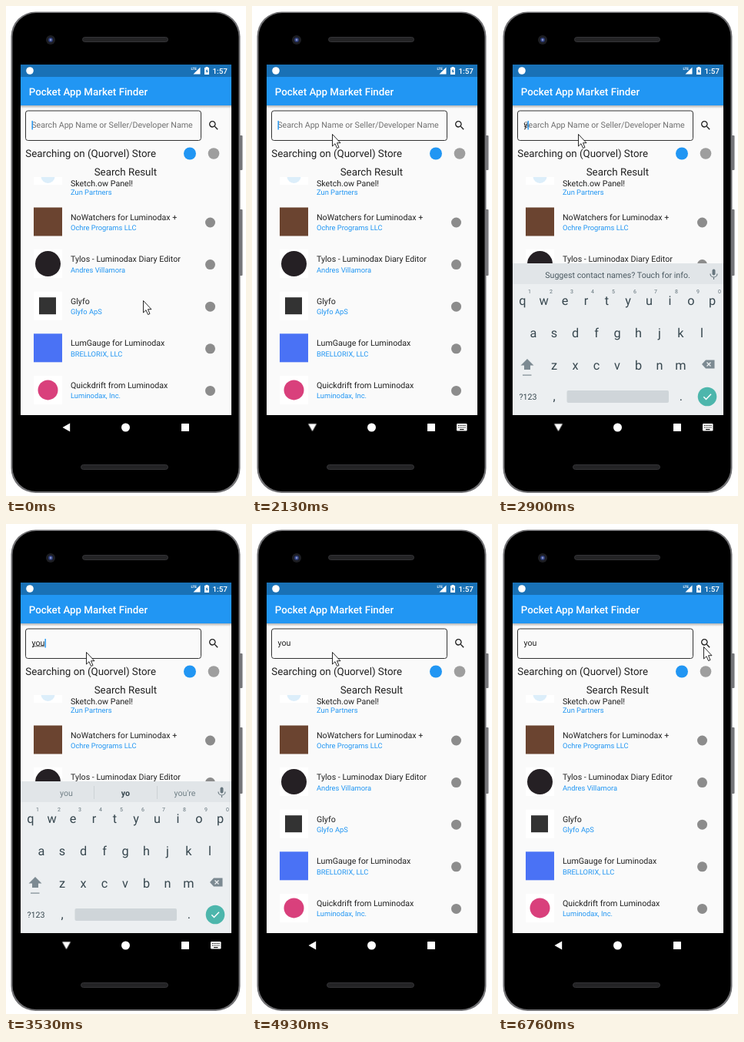
Animation of 312x636 px, one loop 8 s. Source, as an HTML page:

```html
<!DOCTYPE html>
<html lang="en">
<head>
<meta charset="utf-8">
<title>App search on a phone</title>
<style>
  html, body { margin: 0; width: 100%; height: 100%; overflow: hidden; background: #fff; }
  svg { display: block; font-family: Roboto, "Open Sans", sans-serif; text-rendering: geometricPrecision; }
  .h { font-size: 13.33px; fill: #212121; }
  .t { font-size: 10.67px; fill: #212121; }
  .s { font-size: 9.33px; fill: #2196f3; }
  .keys { font-size: 16.3px; fill: #37474f; text-anchor: middle; }
  .nums { font-size: 7px; fill: #607078; text-anchor: middle; }
  .strip { font-size: 10.67px; fill: #718087; text-anchor: middle; }
  .strip .mid { fill: #37474f; font-weight: 700; }

  .anim { animation: 8s linear infinite; }
  .hard { animation-timing-function: step-end; }

  #pointer { animation-name: pointer; }
  @keyframes pointer {
    0%, .4% { transform: translate(178px, 382px); animation-timing-function: ease-in-out; }
    6.625%, 10% { transform: translate(137px, 209px); }
    10.375% { transform: translate(133px, 204px); animation-timing-function: ease-out; }
    16.25%, 63.8% { transform: translate(104px, 166px); animation-timing-function: ease-in-out; }
    70% { transform: translate(257px, 160px); animation-timing-function: ease-out; }
    71.625%, 100% { transform: translate(267px, 159px); }
  }

  #caret { animation-name: caret; }
  @keyframes caret {
    0%, 12.5%, 25.375% { opacity: 1; transform: none; }
    6.625%, 18.25%, 32.5% { opacity: 0; transform: none; }
    36.25% { opacity: 1; transform: translateX(5px); }
    40% { opacity: 1; transform: translateX(11px); }
    44.125%, 56.25% { opacity: 1; transform: translateX(17px); }
    51.25%, 58.25%, 100% { opacity: 0; transform: translateX(17px); }
  }

  #hint { animation-name: hint; }
  @keyframes hint { 0% { opacity: 1; } 37.5%, 100% { opacity: 0; } }
  #typed1 { animation-name: typed1; }
  @keyframes typed1 { 0%, 40%, 100% { opacity: 0; } 36.25% { opacity: 1; } }
  #typed2 { animation-name: typed2; }
  @keyframes typed2 { 0%, 44.125%, 100% { opacity: 0; } 40% { opacity: 1; } }
  #typed3 { animation-name: typed3; }
  @keyframes typed3 { 0% { opacity: 0; } 44.125%, 100% { opacity: 1; } }
  #underline { animation-name: underline; }
  @keyframes underline { 0%, 46.25%, 100% { opacity: 0; } 44.125% { opacity: 1; } }

  #strip1 { animation-name: strip1; }
  @keyframes strip1 { 0% { opacity: 1; } 41.5%, 100% { opacity: 0; } }
  #strip2 { animation-name: strip2; }
  @keyframes strip2 { 0%, 44.5%, 100% { opacity: 0; } 41.5% { opacity: 1; } }
  #strip3 { animation-name: strip3; }
  @keyframes strip3 { 0% { opacity: 0; } 44.5%, 100% { opacity: 1; } }

  #keyboard { animation-name: keyboard; }
  @keyframes keyboard {
    0%, 28.25% { opacity: 0; transform: translateY(20px); animation-timing-function: ease-out; }
    31.5%, 58.25% { opacity: 1; transform: none; animation-timing-function: ease-in; }
    61.5%, 100% { opacity: 0; transform: translateY(20px); }
  }

  #back { animation-name: back; transform-origin: 78.5px 547px; }
  @keyframes back { 0%, 58.75%, 100% { transform: none; } 26.625% { transform: rotate(-90deg); } }
  #imeIcon { animation-name: ime; }
  @keyframes ime { 0%, 58.75%, 100% { opacity: 0; } 26.625% { opacity: 1; } }

  #ripple { animation-name: ripple; }
  @keyframes ripple {
    0%, 79.12% { opacity: 0; }
    79.125%, 81.25% { opacity: .12; }
    84.4%, 100% { opacity: 0; }
  }
</style>
</head>
<body>
<svg width="312" height="636" viewBox="0 0 312 636">
  <defs>
    <linearGradient id="shade" x2="0" y2="1">
      <stop stop-opacity=".28"/><stop offset="1" stop-opacity="0"/>
    </linearGradient>
    <clipPath id="listClip"><rect x="19" y="222" width="274" height="309"/></clipPath>
    <clipPath id="screenClip"><rect x="19" y="76" width="274" height="455"/></clipPath>
    <clipPath id="rippleClip"><rect x="254" y="130" width="39" height="50"/></clipPath>
    <rect id="tile" x="36" y="261.5" width="37" height="37" fill="#fff"/>
    <circle id="dot" cx="265.5" cy="281" r="6.5" fill="#8c8c8c"/>
  </defs>

  <!-- phone body -->
  <g>
    <g fill="#77777a">
      <rect x="303" y="168" width="4.5" height="45" rx="1"/>
      <rect x="303" y="264" width="4.5" height="86" rx="1"/>
    </g>
    <rect x="6.5" y="7.5" width="298" height="624.5" rx="32" fill="#717174"/>
    <rect x="8.5" y="9" width="294" height="621" rx="31" fill="#000"/>
    <circle cx="58" cy="44" r="6" fill="#1d1e23"/>
    <circle cx="58" cy="44" r="3" fill="#2c3c78"/>
    <circle cx="58" cy="44" r="1.4" fill="#8290c8"/>
    <g fill="#232325" stroke="#343437">
      <rect x="99.5" y="40.5" width="111" height="6" rx="3"/>
      <rect x="97.5" y="595.5" width="113" height="6" rx="3"/>
    </g>
  </g>

  <!-- app -->
  <rect x="19" y="76" width="274" height="455" fill="#fafafa"/>
  <rect x="19" y="129" width="274" height="4" fill="url(#shade)"/>
  <rect x="19" y="92" width="274" height="37" fill="#2196f3"/>
  <rect x="19" y="76" width="274" height="16" fill="#1971b6"/>
  <g fill="#fff">
    <circle cx="31" cy="84" r="4.8"/>
    <text x="240.5" y="83" font-size="4.6" font-weight="700">LTE</text>
    <path d="M252.5 79.5V88.5H243.5Z"/>
    <path d="M259.5 79h3v1h1.5v9h-6v-9h1.5Z"/>
    <path d="M261.5 81.5l-2 3.5h1.3v2.5l2-3.6h-1.3Z" fill="#1971b6"/>
    <text x="268.5" y="87.8" font-size="9.9" font-weight="500">1:57</text>
    <text x="29.7" y="115.5" font-size="13.33" font-weight="500">Pocket App Market Finder</text>
  </g>

  <rect x="25.5" y="136" width="228" height="38.5" rx="3" fill="none" stroke="#333"/>
  <text id="hint" class="anim hard t" x="33.3" y="158.3" style="fill:#707070">Search App Name or Seller/Developer Name</text>
  <text id="typed1" class="anim hard t" x="33.5" y="158">y</text>
  <text id="typed2" class="anim hard t" x="33.5" y="158">yo</text>
  <text id="typed3" class="anim hard t" x="33.5" y="158">you</text>
  <rect id="underline" class="anim hard" x="34" y="158.5" width="16" height=".7" fill="#212121"/>
  <rect id="caret" class="anim hard" x="33.5" y="149" width="1.4" height="11.5" fill="#2196f3"/>

  <g clip-path="url(#rippleClip)"><circle id="ripple" class="anim" cx="270" cy="155" r="23"/></g>
  <path transform="translate(262 147) scale(.667)" fill="#212121" d="M15.5 14h-.79l-.28-.27A6.47 6.47 0 0 0 16 9.5 6.5 6.5 0 1 0 9.5 16c1.61 0 3.09-.59 4.23-1.57l.27.28v.79l5 4.99L20.49 19l-4.99-5zm-6 0C7.01 14 5 11.99 5 9.5S7.01 5 9.5 5 14 7.01 14 9.5 11.99 14 9.5 14z"/>

  <text class="h" x="25.3" y="196">Searching on (Quorvel) Store</text>
  <circle cx="239" cy="191.5" r="8" fill="#2196f3"/>
  <circle cx="270" cy="191.5" r="7.3" fill="#9e9e9e"/>
  <text class="h" x="114.7" y="219.7">Search Result</text>

  <g clip-path="url(#listClip)">
    <rect x="36" y="207" width="37" height="25" fill="#fff"/>
    <circle cx="54.5" cy="221" r="9" fill="#dceefa"/>
    <text class="t" x="84" y="233.5">Sketch.ow Panel!</text>
    <text class="s" x="84" y="244.7">Zun Partners</text>
    <g>
      <rect x="36" y="261.5" width="37" height="37" fill="#6b4430"/>
      <text class="t" x="84" y="277.5">NoWatchers for Luminodax +</text>
      <text class="s" x="84" y="291">Ochre Programs LLC</text>
      <use href="#dot"/>
    </g>
    <g transform="translate(0 54.6)">
      <use href="#tile"/><circle cx="54.5" cy="280" r="16.5" fill="#252024"/>
      <text class="t" x="84" y="277.5">Tylos - Luminodax Diary Editor</text>
      <text class="s" x="84" y="291">Andres Villamora</text>
      <use href="#dot"/>
    </g>
    <g transform="translate(0 109.2)">
      <use href="#tile"/><rect x="43" y="269" width="22" height="22" fill="#333"/>
      <text class="t" x="84" y="277.5">Glyfo</text>
      <text class="s" x="84" y="291">Glyfo ApS</text>
      <use href="#dot"/>
    </g>
    <g transform="translate(0 163.8)">
      <rect x="36" y="261.5" width="37" height="37" fill="#4a72f5"/>
      <text class="t" x="84" y="277.5">LumGauge for Luminodax</text>
      <text class="s" x="84" y="291">BRELLORIX, LLC</text>
      <use href="#dot"/>
    </g>
    <g transform="translate(0 218.4)">
      <use href="#tile"/><circle cx="54.5" cy="280" r="13" fill="#d9407c"/>
      <text class="t" x="84" y="277.5">Quickdrift from Luminodax</text>
      <text class="s" x="84" y="291">Luminodax, Inc.</text>
      <use href="#dot"/>
    </g>
  </g>

  <!-- keyboard -->
  <g clip-path="url(#screenClip)">
    <g id="keyboard" class="anim">
      <rect x="19" y="334" width="274" height="197" fill="#eceff1"/>
      <rect x="19" y="334" width="274" height="27" fill="#e1e5e8"/>
      <g class="strip">
        <text id="strip1" class="anim hard" x="155.5" y="352.5" style="fill:#4b5a62">Suggest contact names? Touch for info.</text>
        <g id="strip2" class="anim hard">
          <text x="78.5" y="352.5">you</text>
          <text class="mid" x="155.5" y="352.5">yo</text>
          <text x="232.5" y="352.5">you're</text>
          <path d="M114.5 340v17M196.5 340v17" stroke="#ccd2d5"/>
        </g>
        <g id="strip3" class="anim hard">
          <text x="78.5" y="352.5">you're</text>
          <text class="mid" x="155.5" y="352.5">you</text>
          <text x="232.5" y="352.5">your</text>
          <path d="M114.5 340v17M196.5 340v17" stroke="#ccd2d5"/>
          <path d="M151.5 359h8.1" stroke="#37474f" stroke-width="2" stroke-linecap="round" stroke-dasharray="0 4"/>
        </g>
      </g>
      <rect x="278.5" y="341.5" width="4" height="8" rx="2" fill="#68777f"/>
      <path d="M276 347.5a4.5 4.5 0 0 0 9 0M280.5 352v3" fill="none" stroke="#68777f" stroke-width="1.2"/>

      <text class="nums" y="372.5" x="41 69 96 123 150 178 205 232 260 288">1234567890</text>
      <text class="keys" y="387.5" x="32 59.5 87 114.5 141.5 169 196.5 223.5 251 278.5">qwertyuiop</text>
      <text class="keys" y="429.5" x="46 73 100.5 128 155 182.5 210 237.5 265">asdfghjkl</text>
      <text class="keys" y="471.5" x="73 100.5 128 155 182.5 210 237.5">zxcvbnm</text>
      <text class="keys" y="511.5" x="73 238">,.</text>
      <text class="keys" x="39" y="510.7" style="font-size:10.67px">?123</text>
      <g fill="#7c8a92">
        <path d="M38 458l8.5 8.5H42V472h-8v-5.5H29.5Z"/>
        <rect x="32" y="478.5" width="11.5" height="1.2"/>
        <path d="M270 459.5h11.5v11H270l-5-5.5Z"/>
      </g>
      <path d="M271.5 462.5l5 5m0-5l-5 5" stroke="#eceff1" stroke-width="1.3"/>
      <rect x="89.5" y="499" width="132.5" height="16" rx="2" fill="#cfd5d9"/>
      <circle cx="272" cy="507" r="12.3" fill="#4db6ac"/>
      <path d="M267.3 507.3l3.2 3.2 6.5-6.7" fill="none" stroke="#fff" stroke-width="1.5"/>
    </g>
  </g>

  <!-- navigation bar -->
  <g fill="#fff">
    <path id="back" class="anim hard" d="M73.5 547L83.2 541.5V552.5Z"/>
    <circle cx="155.5" cy="547" r="5.5"/>
    <rect x="228" y="542" width="10" height="10" rx=".5"/>
    <g id="imeIcon" class="anim hard">
      <rect x="266" y="542" width="13.5" height="9.5" rx="1.2"/>
      <path d="M268 544.5h10M268 547h10" stroke="#000" stroke-width="1.2" stroke-dasharray="1.2 .9"/>
      <path d="M270 549.6h5.5" stroke="#000" stroke-width="1.1"/>
    </g>
  </g>

  <path id="pointer" class="anim" d="M.5.5V16L4 12.7 6.6 18.5 9 17.5 6.5 11.7H11Z" fill="#fff" stroke="#111" stroke-width=".9" stroke-linejoin="round"/>
</svg>
</body>
</html>
```
